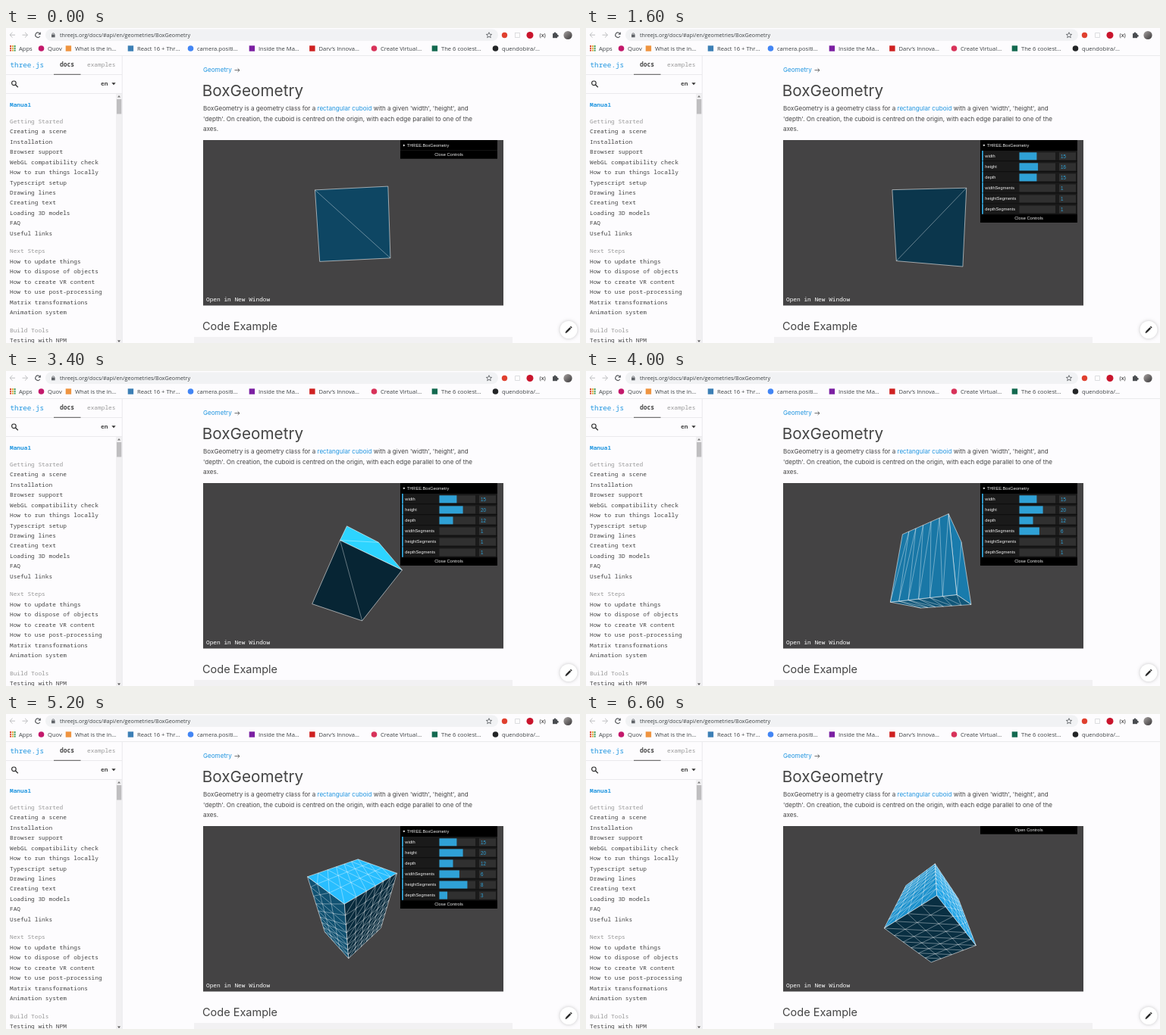
Write an HTML page with a canvas that moves like this. It is 757x416 px and loops after 6800 ms.

```html
<!DOCTYPE html>
<html lang="en">
<head>
<meta charset="utf-8">
<title>BoxGeometry</title>
<style>
html, body { margin: 0; width: 100%; height: 100%; overflow: hidden; background: #fdfcfe; }
canvas { display: block; }
</style>
</head>
<body>
<canvas id="stage" width="757" height="416"></canvas>
<script>
const ctx = document.getElementById('stage').getContext('2d');
const LOOP = 6800, STEP = 200;
const UI = '"Open Sans", "Noto Sans", sans-serif';
const BODY = 'Inter, Roboto, sans-serif';
const MONO = '"Noto Sans Mono", "DejaVu Sans Mono", monospace';
const GUI = '"Liberation Sans", Arial, sans-serif';
const VIEW = { x: 260, y: 148, w: 396, h: 218.5 };
const FOCAL = VIEW.h / 2 / Math.tan(37.5 * Math.PI / 180);
const CAMERA_Z = 30;

// Drawing helpers
function rect(x, y, w, h, color) {
  ctx.fillStyle = color;
  ctx.fillRect(x, y, w, h);
}
function disc(x, y, r, color) {
  ctx.fillStyle = color;
  ctx.beginPath();
  ctx.arc(x, y, r, 0, Math.PI * 2);
  ctx.fill();
}
function trace(points, closed) {
  ctx.beginPath();
  points.forEach(([x, y], i) => i ? ctx.lineTo(x, y) : ctx.moveTo(x, y));
  if (closed) ctx.closePath();
}
function area(points, color) {
  trace(points, true);
  ctx.fillStyle = color;
  ctx.fill();
}
function line(points, color, width = 1) {
  trace(points);
  ctx.strokeStyle = color;
  ctx.lineWidth = width;
  ctx.stroke();
}
function pill(x, y, w, h, r, color) {
  ctx.fillStyle = color;
  ctx.beginPath();
  ctx.roundRect(x, y, w, h, r);
  ctx.fill();
}
function text(str, x, y, size, family, color, weight = 400) {
  ctx.font = `${weight} ${size}px ${family}`;
  ctx.fillStyle = color;
  ctx.fillText(str, x, y);
  return x + ctx.measureText(str).width;
}

// Browser chrome
function arrow(x, y, dir, color) {
  line([[x - 3.5, y], [x + 3.5, y]], color, 1);
  line([[x, y - 3.4], [x + 3.5 * dir, y], [x, y + 3.4]], color, 1);
}
function drawToolbar() {
  pill(52, 1.5, 597, 15.5, 7.7, '#f1f2f4');
  arrow(8.5, 9.2, -1, '#bfc0c2');
  arrow(25, 9.2, 1, '#bfc0c2');
  ctx.strokeStyle = '#55585c';
  ctx.lineWidth = 1.1;
  ctx.beginPath();
  ctx.arc(42, 9.2, 3.2, 0.5, 5.6);
  ctx.stroke();
  area([[45.8, 5.2], [45.8, 8.8], [42.2, 8.8]], '#55585c');
  rect(60, 8.5, 4.6, 3.8, '#5f6368');
  ctx.lineWidth = 0.8;
  ctx.strokeStyle = '#5f6368';
  ctx.beginPath();
  ctx.arc(62.3, 8.3, 1.5, Math.PI, 0);
  ctx.stroke();
  text('threejs.org/docs/#api/en/geometries/BoxGeometry', 71, 12, 7.2, UI, '#3c4043');

  const star = Array.from({ length: 11 }, (_, i) => {
    const a = i * Math.PI / 5 - Math.PI / 2, r = i % 2 ? 1.7 : 3.9;
    return [637 + r * Math.cos(a), 9.6 + r * Math.sin(a)];
  });
  line(star, '#55585c', 0.8);
  disc(657.5, 9.5, 3.7, '#e0402f');
  ctx.strokeStyle = '#d5d6d8';
  ctx.strokeRect(671.5, 6.5, 6, 6);
  disc(691, 9.5, 4.5, '#c9142c');
  text('(x)', 703.5, 12, 7, UI, '#444', 600);
  rect(721, 7.2, 6, 6, '#4a4d51');
  disc(724, 6.9, 1.5, '#4a4d51');
  disc(727.2, 10.2, 1.5, '#4a4d51');
  const shade = ctx.createLinearGradient(736, 4, 746, 15);
  shade.addColorStop(0, '#a5a09f');
  shade.addColorStop(1, '#3b393b');
  disc(741, 9.5, 5.6, shade);
}
const bookmarks = [
  ['Quov', 55, '#c3186b', 'disc'],
  ['What is the in\u2026', 91, '#ef9440'],
  ['React 16 + Thr\u2026', 173, '#3c7fb5'],
  ['camera.positi\u2026', 252, '#4285f4', 'disc'],
  ['Inside the Ma\u2026', 333, '#7b1fa2'],
  ['Darv\u2019s Innova\u2026', 412.5, '#cf2020'],
  ['Create Virtual\u2026', 494, '#d8325a', 'disc'],
  ['The 6 coolest\u2026', 574, '#12694f'],
  ['quendobira/\u2026', 654, '#222426', 'disc']
];
function drawBookmarks() {
  const dots = ['#d9483b', '#e2a32b', '#3f9b57', '#4b83d8'];
  for (let i = 0; i < 9; i++)
    rect(5 + i % 3 * 2.8, 23 + Math.floor(i / 3) * 2.8, 2, 2, dots[(i + Math.floor(i / 3)) % 4]);
  text('Apps', 17, 29.7, 7.6, UI, '#3c4043');
  for (const [label, x, color, shape] of bookmarks) {
    if (shape) disc(x - 8.5, 27, 3.8, color);
    else rect(x - 12.3, 23.3, 7.4, 7.4, color);
    text(label, x, 29.7, 7.6, UI, '#3c4043');
  }
  rect(0, 36, 757, 0.7, '#e3e2e5');
}

// Documentation page
const sections = [
  ['Getting Started', 123, 136.6, ['Creating a scene', 'Installation', 'Browser support',
    'WebGL compatibility check', 'How to run things locally', 'Typescript setup', 'Drawing lines',
    'Creating text', 'Loading 3D models', 'FAQ', 'Useful links']],
  ['Next Steps', 294.5, 308.3, ['How to update things', 'How to dispose of objects',
    'How to create VR content', 'How to use post-processing', 'Matrix transformations',
    'Animation system']],
  ['Build Tools', 399, 412.6, ['Testing with NPM']]
];
function drawSidebar() {
  const size = 7.8, ink = '#444', blue = '#2196e0';
  text('three.js', 5.5, 52, 9.3, MONO, blue, 500);
  text('docs', 71, 51.4, 7.9, MONO, ink, 600);
  text('examples', 107, 51.4, size, MONO, '#999', 500);
  rect(0, 61, 153, 0.8, '#e8e7e9');
  rect(63, 60.8, 35.5, 1, '#555');
  ctx.strokeStyle = '#333';
  ctx.lineWidth = 1.2;
  ctx.beginPath();
  ctx.arc(10.4, 72.8, 2.8, 0, Math.PI * 2);
  ctx.stroke();
  line([[12.5, 75], [15.8, 78.2]], '#333', 1.4);
  text('en', 125, 76.2, size, MONO, ink, 600);
  area([[139.3, 72.3], [144.7, 72.3], [142, 75.2]], '#333');
  rect(0, 86, 153, 0.8, '#e8e7e9');

  text('Manual', 5, 103.8, size, MONO, blue, 600);
  for (const [title, titleY, firstY, items] of sections) {
    text(title, 5, titleY + 2.7, size, MONO, '#999', 500);
    items.forEach((item, i) => text(item, 5, firstY + i * 13.45 + 2.7, size, MONO, ink));
  }
  rect(145, 87, 8, 329, '#f1f0f2');
  rect(146, 94, 6.3, 19.5, '#bfbec0');
  area([[147, 91.5], [151, 91.5], [149, 89]], '#777');
  area([[147, 412.5], [151, 412.5], [149, 415]], '#555');
  rect(152.8, 37, 0.8, 379, '#e6e5e8');
}
function drawArticle() {
  const ink = '#444', blue = '#2196e0', size = 8.1;
  text('Geometry', 260, 58.4, size, BODY, blue);
  line([[301.5, 55.7], [308, 55.7]], ink, 0.8);
  line([[305.6, 53.4], [308, 55.7], [305.6, 58]], ink, 0.8);
  text('BoxGeometry', 258.8, 90.2, 20.7, BODY, ink);
  let x = text('BoxGeometry is a geometry class for a ', 260, 109, size, BODY, ink);
  x = text('rectangular cuboid', x, 109, size, BODY, blue);
  text(" with a given 'width', 'height', and", x, 109, size, BODY, ink);
  text("'depth'. On creation, the cuboid is centred on the origin, with each edge parallel to one of the",
    260, 122.5, size, BODY, ink);
  text('axes.', 260, 136, size, BODY, ink);
  text('Code Example', 259, 399, 14.5, BODY, ink);
  rect(248, 408, 420, 8, '#f2f1f3');

  ctx.save();
  ctx.shadowColor = 'rgba(0,0,0,.22)';
  ctx.shadowBlur = 4;
  disc(742, 398.5, 11.5, '#fff');
  ctx.restore();
  line([[739, 401.5], [744.3, 396.2]], '#222', 2.4);
  line([[744.8, 395.7], [745.8, 394.7]], '#222', 2.4);
  area([[737.6, 403], [738.1, 400.7], [739.9, 402.5]], '#222');
}

// Timeline
const tracks = {
  width: [[0, 15], [600, 17], [800, 18], [1000, 16], [1200, 15]],
  height: [[0, 15], [1600, 16], [1800, 18], [2000, 20]],
  depth: [[0, 15], [2800, 14], [3000, 13], [3200, 12]],
  widthSegments: [[0, 1], [3600, 2], [3800, 4], [4000, 6]],
  heightSegments: [[0, 1], [4200, 3], [4400, 6], [4600, 8]],
  depthSegments: [[0, 1], [5000, 2], [5200, 3], [5400, 4]],
  panel: [[0, 'folded'], [400, 'open'], [6400, 'closed']]
};
const spin = [[0, 1.62], [1000, 2.67], [2400, 4.14], [3400, 5.17], [4600, 6.42], [5800, 7.663], [6600, 8.473]];

const valueAt = (track, t) => track.filter(([start]) => start <= t).pop()[1];
function angleAt(t) {
  const i = Math.max(1, spin.findIndex(([time]) => time >= t));
  const [t0, a0] = spin[i - 1], [t1, a1] = spin[i];
  return a0 + (a1 - a0) * (t - t0) / (t1 - t0);
}

// Cuboid: [u axis, v axis, normal axis, u sign, v sign, normal sign]
const faces = [
  [2, 1, 0, -1, -1, 1], [2, 1, 0, 1, -1, -1],
  [0, 2, 1, 1, 1, 1], [0, 2, 1, 1, -1, -1],
  [0, 1, 2, 1, -1, 1], [0, 1, 2, -1, -1, -1]
];
const lights = [[0, 200, 0], [100, 200, 100], [-100, -200, -100]];
const emissive = [7, 37, 52], diffuse = [21, 98, 137];

function rotate([x, y, z], angle) {
  const c = Math.cos(angle), s = Math.sin(angle);
  const depth = c * z - s * x;
  return [c * x + s * z, c * y - s * depth, s * y + c * depth];
}
function project([x, y, z]) {
  const k = FOCAL / (CAMERA_Z - z);
  return [VIEW.x + VIEW.w / 2 + x * k, VIEW.y + VIEW.h / 2 - y * k];
}
function shadeFace(normal, center) {
  let sum = 0;
  for (const light of lights) {
    const dir = light.map((v, i) => v - center[i]);
    sum += Math.max(0, dir.reduce((a, v, i) => a + v * normal[i], 0) / Math.hypot(...dir));
  }
  return `rgb(${emissive.map((e, i) => Math.min(255, Math.round(e + diffuse[i] * sum)))})`;
}
function drawBox(state, angle) {
  const size = [state.width, state.height, state.depth];
  const segments = [state.widthSegments, state.heightSegments, state.depthSegments];
  for (const [u, v, n, su, sv, sn] of faces) {
    const axis = [0, 0, 0];
    axis[n] = sn;
    const normal = rotate(axis, angle), half = size[n] / 2;
    if (normal[2] * CAMERA_Z <= half) continue;
    const at = (i, j) => {
      const p = [0, 0, 0];
      p[u] = su * size[u] * (i / segments[u] - 0.5);
      p[v] = sv * size[v] * (j / segments[v] - 0.5);
      p[n] = sn * half;
      return project(rotate(p, angle));
    };
    const cols = segments[u], rows = segments[v];
    const outline = [at(0, 0), at(cols, 0), at(cols, rows), at(0, rows)];
    area(outline, shadeFace(normal, normal.map(k => k * half)));
    const mesh = 'rgba(255,255,255,.5)', thin = 0.75;
    for (let i = 1; i < cols; i++) line([at(i, 0), at(i, rows)], mesh, thin);
    for (let j = 1; j < rows; j++) line([at(0, j), at(cols, j)], mesh, thin);
    for (let i = 0; i < cols; i++)
      for (let j = 0; j < rows; j++) line([at(i, j + 1), at(i + 1, j)], mesh, thin);
    line([...outline, outline[0]], 'rgba(255,255,255,.65)', 0.85);
  }
}

// Control panel
function panelButton(label, y) {
  rect(520, y, 128, 10.7, '#000');
  ctx.textAlign = 'center';
  text(label, 584, y + 7, 5.75, GUI, '#eee');
  ctx.textAlign = 'left';
}
function drawPanel(state) {
  if (state.panel === 'closed') return panelButton('Open Controls', 148);
  const open = state.panel === 'open';
  rect(520, 148, 128, 14, '#000');
  area(open ? [[523.4, 154], [526.4, 154], [524.9, 156.4]]
            : [[524, 153.4], [526.4, 154.9], [524, 156.4]], '#eee');
  text('THREE.BoxGeometry', 528.7, 157, 5.7, GUI, '#eee');
  if (!open) {
    panelButton('Close Controls', 162);
    return rect(520, 161.6, 128, 0.5, '#2c2c2c');
  }
  const row = 14.05;
  Object.keys(tracks).slice(0, 6).forEach((name, i) => {
    const y = 162 + i * row, max = i < 3 ? 30 : 10;
    rect(520, y, 128, row + 0.3, '#000');
    rect(522, y, 126, row - 0.5, '#1a1a1a');
    rect(522, y, 1.8, row - 0.5, '#2fa1d6');
    text(name, 526.3, y + 9, 5.7, GUI, '#eee');
    rect(571.5, y + 2.3, 47.5, 10, '#303030');
    rect(571.5, y + 2.3, 47.5 * (state[name] - 1) / (max - 1), 10, '#2fa1d6');
    rect(624, y + 2.3, 22, 10.2, '#303030');
    text(String(state[name]), 626, y + 10, 6.3, GUI, '#2fa1d6');
  });
  panelButton('Close Controls', 162 + 6 * row);
}

function draw(t) {
  const state = {};
  for (const name in tracks) state[name] = valueAt(tracks[name], t);
  rect(0, 0, 757, 416, '#fdfcfe');
  drawToolbar();
  drawBookmarks();
  drawSidebar();
  drawArticle();
  rect(VIEW.x, VIEW.y, VIEW.w, VIEW.h, '#444344');
  ctx.lineJoin = 'round';
  drawBox(state, angleAt(t));
  drawPanel(state);
  text('Open in New Window', 264, 360.5, 7.8, MONO, '#fff');
}

let shown = -1;
function tick() {
  const t = Math.floor(performance.now() % LOOP / STEP) * STEP;
  if (t !== shown) draw(shown = t);
  requestAnimationFrame(tick);
}
tick();
</script>
</body>
</html>
```
